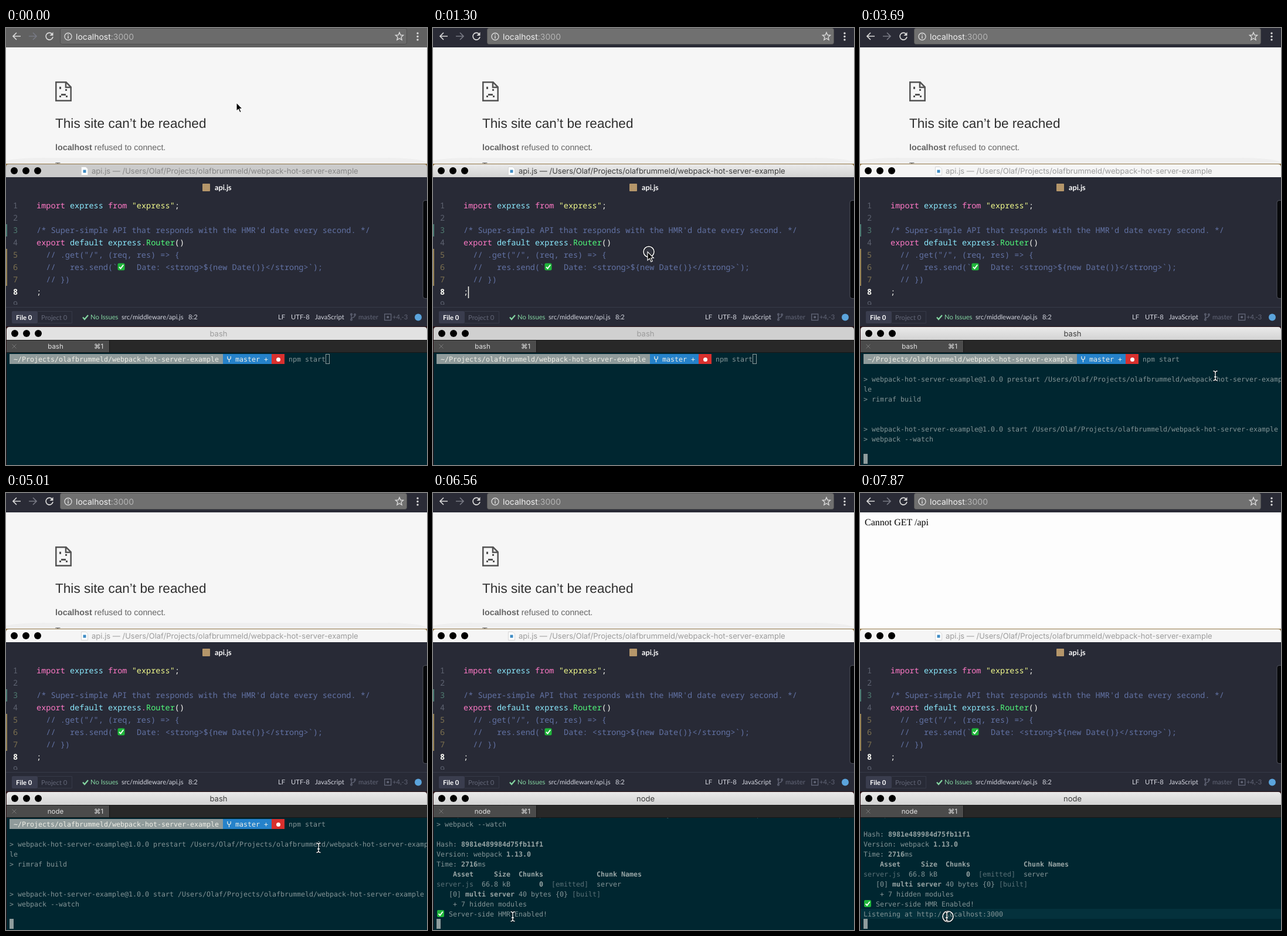
An HTML page that plays this animation: 718 by 744 pixels, repeating every 7990 ms.

```html
<!DOCTYPE html>
<html lang="en">
<head>
<meta charset="utf-8">
<title>Hot server reload</title>
<style>
html, body { margin: 0; width: 100%; height: 100%; overflow: hidden; background: #282a36; }
svg { display: block; width: 718px; height: 744px; text-rendering: geometricPrecision; }
text { white-space: pre; }
.hide { display: none; }
.ui { font: 13px Inter, sans-serif; }
.page { font: 14.3px "Liberation Sans", sans-serif; fill: #646464; }
.code { font: 500 13.55px "Noto Sans Mono", monospace; fill: #f8f8f2; }
.status { font: 11.25px Lato, sans-serif; fill: #d3d5de; }
.term { font: 11.63px "DejaVu Sans Mono", monospace; fill: #839496; }
.mid { text-anchor: middle; }
.pink { fill: #ff79c6; } .cyan { fill: #8be9fd; } .yellow { fill: #f1fa8c; }
.green { fill: #50fa7b; } .note { fill: #6272a4; font-weight: 400; }
.num { fill: #5d6270; font-weight: 400; } .mod { fill: #7d7150; font-weight: 400; }
.b { font-weight: 700; fill: #98a5a5; } .dim { fill: #5a7177; } .light { fill: #eeeee6; }
.grey { fill: #636778; }

/* Window chrome, by focused window */
.bar { fill: #f5f5f5; }
.name { fill: #9b9b9b; }
.dots circle { fill: #dcdcdc; stroke: #cbcbcb; }
.tools { fill: #2a2b36; }
.field { fill: #707070; stroke: #555; }
[data-focus=browser] .tools { fill: #616161; }
[data-focus=browser] .field { fill: #6b6b6b; stroke: #4d4d4d; }
[data-focus=browser] .editor .bar { fill: #cbcbcb; }
[data-focus=browser] .editor .name { fill: #858585; }
[data-focus=browser] .dots circle { fill: #b9b9b9; stroke: #aaa; }
[data-focus=browser] .shell .bar { fill: #e2e2e2; }
[data-focus=editor] .shell .bar { fill: #d0d0d0; }
[data-focus=editor] .shell .dots circle { fill: #bdbdbd; stroke: #b0b0b0; }
[data-focus=editor] .editor .bar, [data-focus=shell] .shell .bar { fill: url(#metal); }
[data-focus=editor] .editor .name, [data-focus=shell] .shell .name { fill: #3c3c3c; }
[data-focus=editor] .editor .dots circle, [data-focus=shell] .shell .dots circle { stroke: none; }
[data-focus=editor] .editor .r, [data-focus=shell] .shell .r { fill: #fc5753; }
[data-focus=editor] .editor .y, [data-focus=shell] .shell .y { fill: #fdbc2f; }
[data-focus=editor] .editor .g, [data-focus=shell] .shell .g { fill: #28c840; }
.caret { display: none; }
[data-focus=editor] .caret { display: inline; }
#cursor { fill: none; stroke: #8f9c9d; }
[data-focus=shell] #cursor { fill: #8f9c9d; }
</style>
</head>
<body>
<svg id="stage" viewBox="0 0 718 744" data-focus="browser">
  <defs>
    <linearGradient id="metal" x2="0" y2="1"><stop stop-color="#eaeaea"/><stop offset="1" stop-color="#d3d3d3"/></linearGradient>
    <clipPath id="view"><path d="M0 33H718V231H0z"/></clipPath>
    <clipPath id="pane"><path d="M0 254H718V471H0z"/></clipPath>
    <clipPath id="screen"><path d="M0 553H718V744H0z"/></clipPath>
    <g id="tick"><rect width="12" height="12" rx="2" fill="#1fb53a"/><path d="M2.5 6.3L5 9L9.7 2.8" fill="none" stroke="#fff" stroke-width="1.9"/></g>
    <g id="dots"><circle class="r" r="6"/><circle class="y" cx="20" r="6"/><circle class="g" cx="40" r="6"/></g>
    <g id="branch" fill="none" stroke-width="1.3"><path d="M2 2V10M8 3V4Q8 6 2 8"/><circle cx="2" cy="1.5" r="1.3"/><circle cx="2" cy="10.5" r="1.3"/><circle cx="8" cy="2" r="1.3"/></g>
  </defs>

  <!-- Browser -->
  <rect class="tools" width="718" height="33"/>
  <rect class="field" x="92.5" y=".5" width="591" height="27" rx="3"/>
  <g fill="none" stroke="#d8d8d8" stroke-width="1.7">
    <path d="M25 14H12.500M18 8L12 14L18 20"/>
    <path d="M39 14H51.500M46 8L52 14L46 20" stroke="#777983"/>
    <path d="M78.500 10A6 6 0 1 0 80 15"/>
    <circle cx="106" cy="14.500" r="6" stroke-width="1.400"/>
    <path d="M106 13.500V18M106 10.800V12.300" stroke-width="1.600"/>
    <path d="M671 7.500L672.900 12L677.600 12.400L674 15.500L675.100 20.200L671 17.700L666.900 20.200L668 15.500L664.400 12.400L669.100 12z" stroke-width="1.400"/>
  </g>
  <path d="M80.500 7V13H74.500z" fill="#d8d8d8"/>
  <g fill="#d8d8d8"><circle cx="702" cy="9" r="1.700"/><circle cx="702" cy="14.500" r="1.700"/><circle cx="702" cy="20" r="1.700"/></g>
  <text class="ui" x="119" y="19.500" style="font-size:14px" fill="#f0f0f0">localhost<tspan fill="#b4b4b4">:3000</tspan></text>

  <g clip-path="url(#view)">
    <g id="error" class="page">
      <rect y="33" width="718" height="198" fill="#f6f6f6"/>
      <path d="M85.300 92.300H102.500L110.700 100.500V123.700H85.300zM102 92V101H111" fill="none" stroke="#535353" stroke-width="2.500"/>
      <path d="M91 100H94V104H91zM101 104H104V107H101zM94 112H102V115H94zM91 115H94V118H91zM102 115H105V118H102z" fill="#535353"/>
      <text x="84" y="170" style="font-size:22.600px" fill="#2f2f2f">This site can’t be reached</text>
      <text x="84" y="208"><tspan font-weight="700">localhost</tspan> refused to connect.</text>
      <text x="84" y="239">Try:</text>
      <path d="M0 232V226Q20 221 70 221H650Q714 222 718 230V232z" opacity=".05"/>
    </g>
    <g id="reply" class="hide">
      <rect y="33" width="718" height="198" fill="#fdfdfd"/>
      <text x="8" y="55" style="font:16px 'Liberation Serif',serif">Cannot GET /api</text>
    </g>
  </g>

  <!-- Editor -->
  <g class="editor">
    <rect y="231" width="718" height="8" fill="#937747"/>
    <rect y="254" width="718" height="254" fill="#282a36"/>
    <path class="bar" d="M0 254V237Q0 232 5 232H713Q718 232 718 237V254z"/>
    <use href="#dots" class="dots" x="14" y="243"/>
    <path d="M128.500 236.500H136L139.500 240V250.500H128.500z" fill="#fff" stroke="#d5d5d5"/>
    <rect x="131.500" y="241.500" width="5" height="5" fill="#3f8cc4"/>
    <text class="ui name" x="146" y="248">api.js — /Users/Olaf/Projects/olafbrummeld/webpack-hot-server-example</text>
    <rect x="335" y="265" width="13" height="13" rx="1" fill="#b5966a"/>
    <text x="356" y="276" style="font:700 12.700px Lato,sans-serif" fill="#fff">api.js</text>
    <path d="M0 334H2V355H0z" fill="#4c7d74"/>
    <path d="M0 376H2V439H0z" fill="#9a8455"/>
    <g class="code" clip-path="url(#pane)">
      <g id="gutter"></g>
      <text x="52" y="307"><tspan class="pink">import</tspan> <tspan class="cyan">express</tspan> <tspan class="pink">from</tspan> <tspan class="yellow">"express"</tspan>;</text>
      <text class="note" x="52" y="349">/* Super-simple API that responds with the HMR'd date every second. */</text>
      <text x="52" y="370"><tspan class="pink">export</tspan> <tspan class="cyan">default express</tspan><tspan class="pink">.</tspan><tspan class="green">Router</tspan>()</text>
      <text class="note" x="52" y="391">  // .get("/", (req, res) =&gt; {</text>
      <text class="note" x="52" y="412">  //   res.send(`</text>
      <use href="#tick" x="190.500" y="400.500"/>
      <text class="note" x="223" y="412">Date: &lt;strong&gt;${new Date()}&lt;/strong&gt;`);</text>
      <text class="note" x="52" y="433">  // })</text>
      <text x="52" y="454">;</text>
    </g>
    <path class="caret" d="M60.500 440V460" stroke="#f8f8f0" stroke-width="1.500"/>
    <rect x="711" y="293.500" width="10" height="167" rx="4" fill="#07080b" stroke="#50525c"/>

    <path d="M0 475.500H718" stroke="#373a49"/>
    <g class="status">
      <rect x="10" y="482" width="44" height="21" rx="2" fill="#3a3d4e"/>
      <path d="M54 482.500H112.500V502.500H54" fill="none" stroke="#363947"/>
      <text x="17" y="497" fill="#fff" font-weight="700">File 0</text>
      <text class="grey" x="60" y="497">Project 0</text>
      <path d="M131 492.500L134 496L140 489" fill="none" stroke="#84d6a2" stroke-width="2.200"/>
      <text x="144" y="496" style="fill:#84d6a2">No Issues</text>
      <text x="197" y="496">src/middleware/api.js</text>
      <text x="311" y="496">8:2</text>
      <text x="464" y="496">LF</text>
      <text x="486" y="496">UTF-8</text>
      <text x="527" y="496">JavaScript</text>
      <use href="#branch" x="587" y="486" stroke="#636778"/>
      <text class="grey" x="601" y="496">master</text>
      <rect x="645.700" y="487" width="11" height="10.500" fill="none" stroke="#636778" stroke-width="1.300"/>
      <circle class="grey" cx="651.200" cy="492.300" r="2"/>
      <text class="grey" x="659" y="496">+4,-3</text>
      <circle cx="703" cy="492.500" r="6" fill="#5ba4dc"/>
    </g>
  </g>

  <!-- Terminal -->
  <g class="shell">
    <rect y="508" width="718" height="236" fill="#2a1215"/>
    <rect x="1" y="531" width="717" height="213" fill="#002630"/>
    <path class="bar" d="M1 531V514Q1 509 6 509H713Q718 509 718 514V531z"/>
    <use href="#dots" class="dots" x="15" y="520"/>
    <text class="ui name mid" id="title" x="362.500" y="525">bash</text>
    <rect x="1" y="531" width="717" height="22" fill="#282828"/>
    <rect x="1" y="532" width="175" height="20" fill="#4b4b4b"/>
    <path d="M1 531.500H718M1 552.500H718M176.500 532V552" stroke="#161616"/>
    <path d="M10.500 538.500L17.500 545.500M17.500 538.500L10.500 545.500" stroke="#777"/>
    <g class="ui" style="font-size:11.500px" fill="#e2e2e2">
      <text class="mid" id="tab" x="84.500" y="546">bash</text>
      <text x="150" y="546" style="font-family:Inter,'DejaVu Sans',sans-serif">⌘1</text>
    </g>
    <g clip-path="url(#screen)">
      <g id="log" class="term">
        <rect x="6" y="555" width="364" height="17" fill="#8f9b9b"/>
        <rect x="370" y="555" width="83" height="17" fill="#2582ca"/>
        <rect x="453" y="555" width="22" height="17" fill="#d8302e"/>
        <path d="M380.500 569V564.500M377.800 559V562Q377.800 564 380.500 564.500Q383.200 564 383.200 562V559" fill="none" stroke="#eeeee6" stroke-width="1.200"/>
        <circle cx="464.500" cy="564.500" r="3.500" fill="#fff"/>
        <rect id="guide" class="hide" x="1" y="861" width="717" height="17" fill="#04313c"/>
        <rect id="cursor" x=".5" y=".5" width="6" height="16"/>
      </g>
    </g>
  </g>

  <g id="mouse">
    <circle id="ring" cx="2" cy="0" r="9" fill="#fff" fill-opacity=".06" stroke="#fff" stroke-width="1.500" style="filter:drop-shadow(0 0 1px #000)"/>
    <path id="arrow" d="M0 0V14.500L3.400 11.400L5.900 17L8.200 16L5.800 10.500H10.300z" fill="#000" stroke="#fff" stroke-width="1.100"/>
    <g id="beam" fill="none">
      <path d="M-3.500 -8Q0 -8 0 -5V5Q0 8 -3.500 8M3.500 -8Q0 -8 0 -5M0 5Q0 8 3.500 8M-2 2H2" stroke="#0008" stroke-width="3"/>
      <path d="M-3.500 -8Q0 -8 0 -5V5Q0 8 -3.500 8M3.500 -8Q0 -8 0 -5M0 5Q0 8 3.500 8M-2 2H2" stroke="#fff" stroke-width="1.300"/>
    </g>
  </g>
</svg>
<script>
const LOOP = 7990, TICK = 116.6, ROW = 17, COL = 7;
const $ = id => document.getElementById(id);
const show = (el, on) => el.classList.toggle('hide', !on);

function add(parent, tag, attrs, content = '') {
  const el = document.createElementNS('http://www.w3.org/2000/svg', tag);
  for (const k in attrs) el.setAttribute(k, attrs[k]);
  el.textContent = content;
  return parent.appendChild(el);
}

for (let n = 1; n <= 9; n++) {
  const attrs = { x: 12, y: 286 + 21 * n, class: n > 4 && n < 8 ? 'mod' : n === 8 ? '' : 'num' };
  if (n === 3) attrs.style = 'fill:#4f7a70';
  if (n === 8) attrs['font-weight'] = 700;
  add($('gutter'), 'text', attrs, n);
}

const START = 3690, BUILT = 6560, READY = 6800, LOADED = 7040;
const pkg = 'webpack-hot-server-example';
const home = '/Users/Olaf/Projects/olafbrummeld/';

// time, row, column, text, style
const lines = [
  [0, 0, 1, '~/Projects/olafbrummeld/' + pkg, 'light'],
  [0, 0, 55, 'master +', 'light'],
  [0, 0, 68, 'npm start'],
  [3450, 2, 0, `> ${pkg}@1.0.0 prestart ${home}webpack-hot-server-examp`],
  [3450, 3, 0, 'le'],
  [3450, 4, 0, '> rimraf build'],
  [START, 7, 0, `> ${pkg}@1.0.0 start ${home}${pkg}`],
  [START, 8, 0, '> webpack --watch'],
  [BUILT, 10, 0, 'Hash:'],
  [BUILT, 10, 6, '8981e489984d75fb11f1', 'b'],
  [BUILT, 11, 0, 'Version: webpack'],
  [BUILT, 11, 17, '1.13.0', 'b'],
  [BUILT, 12, 0, 'Time:'],
  [BUILT, 12, 6, '2716', 'b'],
  [BUILT, 12, 10, 'ms'],
  [BUILT, 13, 4, 'Asset     Size  Chunks             Chunk Names', 'b'],
  [BUILT, 14, 0, 'server.js', 'dim'],
  [BUILT, 14, 11, '66.8 kB'],
  [BUILT, 14, 25, '0', 'b'],
  [BUILT, 14, 28, '[emitted]', 'dim'],
  [BUILT, 14, 39, 'server'],
  [BUILT, 15, 3, '[0]'],
  [BUILT, 15, 7, 'multi server', 'b'],
  [BUILT, 15, 20, '40 bytes {0}'],
  [BUILT, 15, 33, '[built]', 'dim'],
  [BUILT, 16, 4, '+ 7 hidden modules'],
  [BUILT, 17, 3, 'Server-side HMR Enabled!'],
  [READY, 18, 0, 'Listening at http://localhost:3000']
].map(([at, row, col, str, cls = '']) => ({
  at, el: add($('log'), 'text', { x: 6 + COL * col, y: 568 + ROW * row, class: cls }, str)
}));
lines.push({ at: BUILT, el: add($('log'), 'use', { href: '#tick', x: 7, y: 557 + ROW * 17 }) });

// time, column, row, scrolled rows
const cursor = [[0, 77, 0, 0], [3090, 0, 1, 0], [3450, 0, 6, 0], [START, 0, 10, 0], [BUILT, 0, 18, 8], [READY, 0, 19, 9]];

// start, steps, x, y
const moves = [
  [120, 6, 366, 381], [1660, 4, 335, 660], [2130, 3, 500, 686], [3450, 3, 606, 592],
  [5010, 1, 533, 604], [5130, 2, 368, 672], [5730, 5, 136, 721], [7520, 3, 148, 721]
];
const clicks = [[1300, 1420], [2010, 2130], [7870, LOOP]];

function mouseAt(t) {
  let x = 393, y = 127;
  for (const [at, steps, tx, ty] of moves) {
    if (t < at) break;
    const p = Math.min(1, (Math.floor((t - at) / TICK) + 1) / steps);
    const e = p * p * (3 - 2 * p);
    x += (tx - x) * e;
    y += (ty - y) * e;
  }
  return [x, y];
}

function draw(t) {
  $('stage').dataset.focus = t < 1300 ? 'browser' : t < 2010 ? 'editor' : 'shell';
  show($('error'), t < LOADED);
  show($('reply'), t >= LOADED);
  show($('guide'), t >= READY);
  $('tab').textContent = t < 5010 ? 'bash' : 'node';
  $('title').textContent = t < 5130 ? 'bash' : 'node';

  for (const { at, el } of lines) show(el, t >= at);
  const [, col, row, scroll] = cursor.filter(c => t >= c[0]).pop();
  $('cursor').setAttribute('transform', `translate(${6 + COL * col} ${555 + ROW * row})`);
  $('log').setAttribute('transform', `translate(0 ${-ROW * scroll})`);

  const [x, y] = mouseAt(t);
  $('mouse').setAttribute('transform', `translate(${x} ${y})`);
  show($('arrow'), y < 553);
  show($('beam'), y >= 553);
  show($('ring'), clicks.some(([a, b]) => t >= a && t < b));
}

const t0 = performance.now();
function tick() {
  draw((performance.now() - t0) % LOOP);
  requestAnimationFrame(tick);
}
tick();
</script>
</body>
</html>
```
